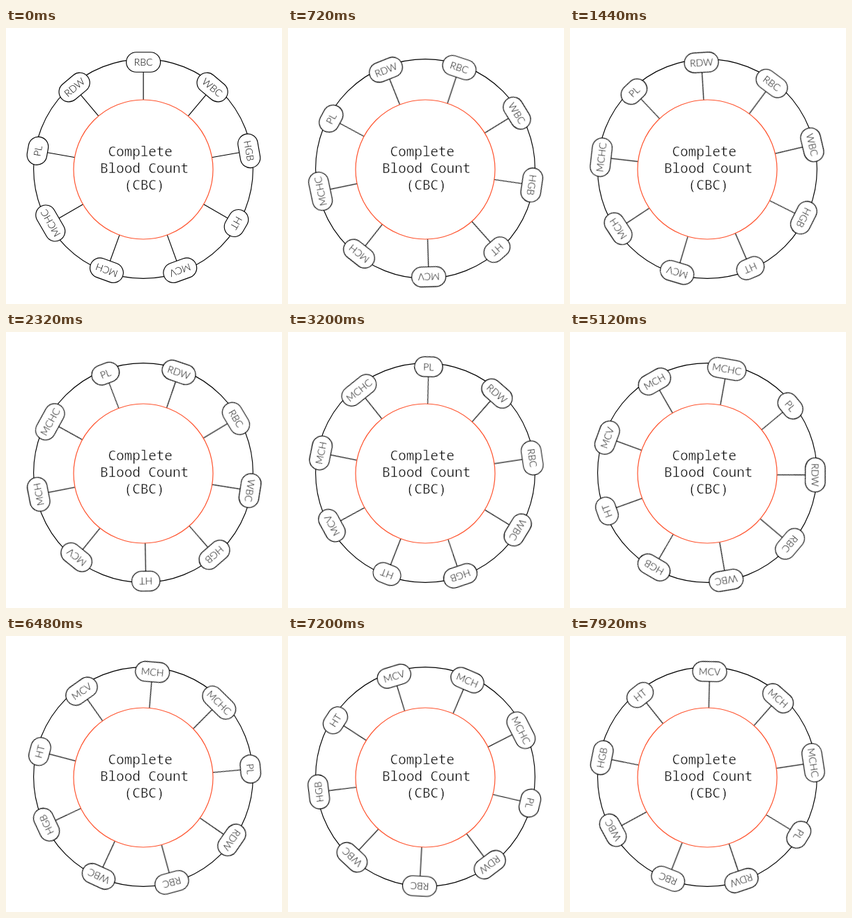
These frames come from a looping animation (396x396 px, 8 s). An HTML page:

```html
<!DOCTYPE html>
<html lang="en">
<head>
<meta charset="utf-8">
<title>Complete Blood Count</title>
<style>
  html, body { margin: 0; width: 100%; height: 100%; overflow: hidden; background: #fff; }
  svg { display: block; width: 100%; height: 100%; }
  .line { fill: #fff; stroke: #000; stroke-width: 1.15; }
  .hub { fill: #fff; stroke: #ff5530; stroke-width: 1.2; }
  /* The white outline thins the strokes to a light weight. */
  .title {
    font: 300 19.25px "Noto Sans Mono", monospace;
    stroke: #fff;
    stroke-width: .5;
  }
  .label { font: 300 14px Lato, sans-serif; text-anchor: middle; }
  #wheel {
    transform-origin: 197.1px 204px;
    animation: turn 8s steps(100, end) infinite;
  }
  @keyframes turn {
    from { transform: rotate(0deg); }
    to { transform: rotate(203.39deg); }
  }
</style>
</head>
<body>
<svg viewBox="0 0 396 396">
  <circle class="line" cx="197" cy="202" r="157.4"/>
  <g id="wheel"></g>
  <circle class="hub" cx="197" cy="203" r="100"/>
  <g class="title">
    <text x="146.5" y="183.5">Complete</text>
    <text x="135" y="207.6">Blood Count</text>
    <text x="169.6" y="231.5">(CBC)</text>
  </g>
</svg>
<script>
  const labels = ["RBC", "WBC", "HGB", "HT", "MCV", "MCH", "MCHC", "PL", "RDW"];
  const widths = { 2: 40.5, 3: 49, 4: 55.5 };
  const radius = 154, height = 28.5;

  // Each spoke is drawn pointing up, then turned into place.
  const spoke = (name, i) => {
    const w = widths[name.length];
    return `<g transform="translate(197.1 203) rotate(${i * 360 / labels.length})">
      <line class="line" y1="${-radius}" y2="-98"/>
      <rect class="line" x="${-w / 2}" y="${-radius - height / 2}" width="${w}" height="${height}" rx="${height / 2}"/>
      <text class="label" y="${5.2 - radius}">${name}</text>
    </g>`;
  };

  document.getElementById("wheel").innerHTML = labels.map(spoke).join("");
</script>
</body>
</html>
```
